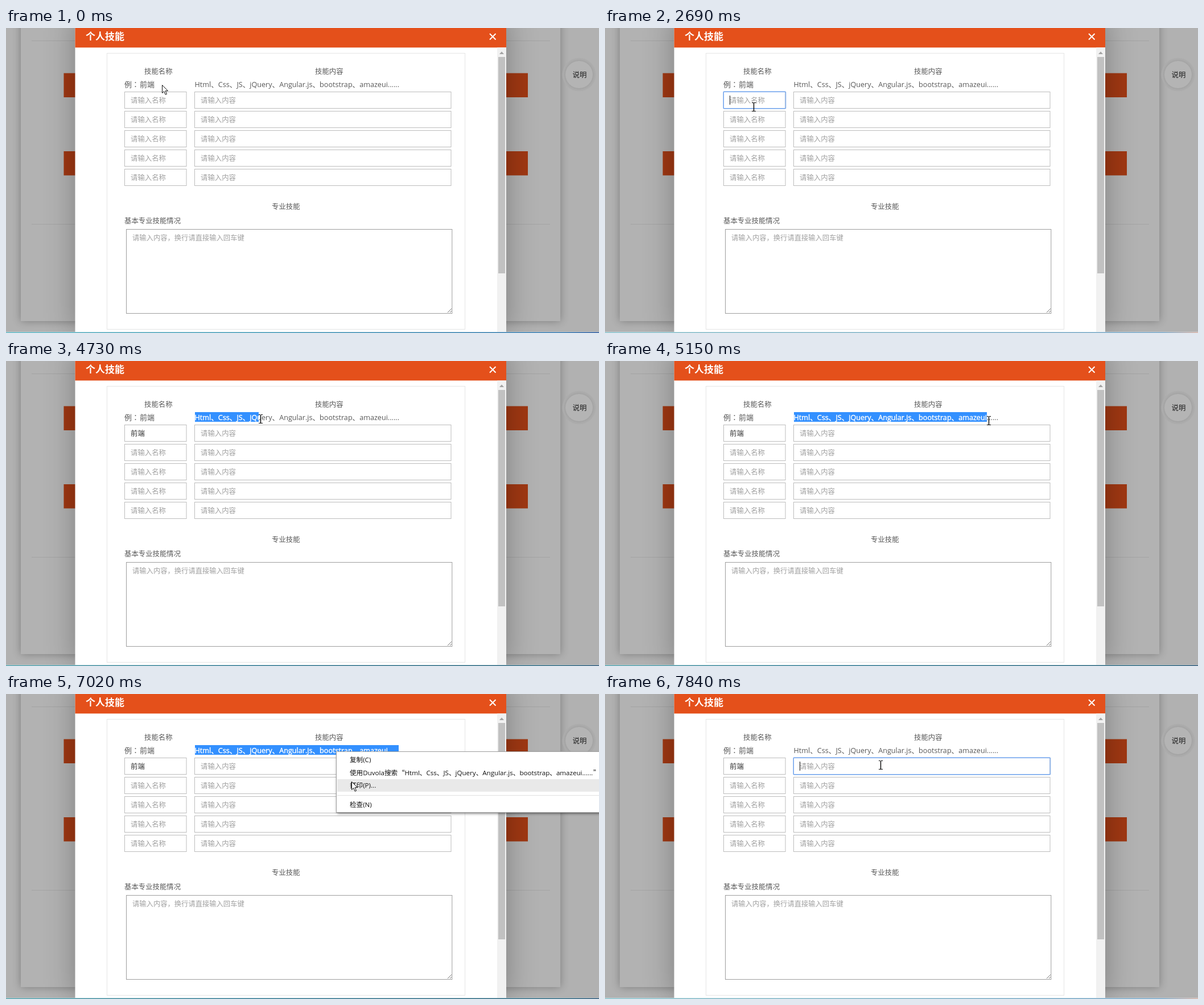
Animation, 1042 px wide and 537 px high, one loop 8 s. Source, as an HTML page with a canvas:

```html
<!DOCTYPE html>
<html lang="zh-CN">
<head>
<meta charset="utf-8">
<style>
html, body { margin: 0; width: 100%; height: 100%; overflow: hidden; background: #b2b2b2; }
canvas { display: block; }
</style>
</head>
<body>
<canvas id="stage" width="1042" height="537"></canvas>
<script>
const LOOP = 8000, W = 1042, H = 537;
const FONT = '"Open Sans", "Noto Sans CJK SC", "Noto Sans CJK", sans-serif';
const CJK = '"Noto Sans CJK SC", "Noto Sans CJK", sans-serif';
const CENTRED_COLON = '"Noto Sans CJK JP", "Noto Sans CJK", sans-serif';
const SKILLS = 'Html、Css、JS、jQuery、Angular.js、bootstrap、amazeui......';
const SKILLS_SIZE = 12.62;
const ORANGE = '#e4501b', SELECT = '#3390ff';
const screen = document.getElementById('stage').getContext('2d');
const backdrop = document.createElement('canvas');
backdrop.width = W;
backdrop.height = H;
let g = backdrop.getContext('2d');

function rect(x, y, w, h, color) {
  g.fillStyle = color;
  g.fillRect(x, y, w, h);
}

function frame(x, y, w, h, color) {
  g.strokeStyle = color;
  g.lineWidth = 1;
  g.strokeRect(x + .5, y + .5, w - 1, h - 1);
}

function line(points, color, width = 1) {
  g.beginPath();
  points.forEach(([x, y]) => g.lineTo(x, y));
  g.strokeStyle = color;
  g.lineWidth = width;
  g.stroke();
}

// y is the vertical centre of the CJK glyphs
function text(s, x, y, color = '#595959', size = 12.4, family = FONT, weight = 400) {
  g.font = `${weight} ${size}px ${family}`;
  g.fillStyle = color;
  g.fillText(s, x, y + size * .37);
}

function shadowed(blur, color, offset, paint) {
  g.save();
  g.shadowBlur = blur;
  g.shadowColor = color;
  g.shadowOffsetY = offset;
  paint();
  g.restore();
}

function disc(x, y, r, color) {
  g.beginPath();
  g.arc(x, y, r, 0, 7);
  g.fillStyle = color;
  g.fill();
}

function paintBackdrop() {
  rect(0, 0, W, H, '#b1b1b1');
  shadowed(14, 'rgba(0,0,0,.3)', 0, () => rect(26, -30, 948, 546, '#b2b2b2'));
  rect(45, 22, 911, 1, '#a3a3a3');
  rect(45, 345, 911, 1, '#a3a3a3');
  rect(101.5, 79.5, 815.5, 42.5, '#a03813');
  rect(101.5, 217, 815.5, 42.5, '#a03813');
  disc(1007, 82, 29.5, '#acacac');
  shadowed(4, 'rgba(0,0,0,.12)', 0, () => disc(1007, 82, 24, '#b4b4b4'));
  text('说明', 995.5, 82, '#1c1c1c');

  shadowed(50, 'rgba(0,0,0,.3)', 1, () => rect(121.5, -20, 757.5, 555, '#fff'));
  rect(121.5, 0, 757.5, 34.4, ORANGE);
  text('个人技能', 140, 15, '#fff', 17, FONT, 700);
  line([[850, 10], [860.5, 20.5]], '#fff', 2);
  line([[860.5, 10], [850, 20.5]], '#fff', 2);

  rect(863, 34.4, 16, 500.6, '#f1f1f1');
  rect(865, 51, 12, 381, '#c1c1c1');
  g.beginPath();
  g.moveTo(867, 46);
  g.lineTo(875, 46);
  g.lineTo(871, 41.5);
  g.fillStyle = '#a3a3a3';
  g.fill();

  frame(177, 44, 630, 487, '#e5e5e5');
  text('技能名称', 243, 76);
  text('技能内容', 543, 76);
  text('例：', 208, 99, '#595959', 13, CENTRED_COLON);
  text('前端', 235, 99, '#595959', 13);
  text(SKILLS, 331.5, 99, '#595959', SKILLS_SIZE);
  for (let i = 0; i < 5; i++) {
    const y = 112 + 34 * i;
    frame(208, y, 109.5, 30, '#bdbdbd');
    frame(331, y, 451.5, 30, '#bdbdbd');
    if (i) text('请输入名称', 219, y + 15, '#a0a0a0');
    text('请输入内容', 342, y + 15, '#a0a0a0');
  }
  text('专业技能', 467, 314);
  text('基本专业技能情况', 208, 339);
  frame(211, 354, 573.3, 149, '#9e9e9e');
  text('请输入内容，换行请直接输入回车键', 222, 369, '#a0a0a0', 12.3);
  line([[776, 501], [783, 494]], '#777');
  line([[780, 501], [783, 498]], '#777');
}

// start, end, number of steps, destination x, y
const MOVES = [
  [410, 1180, 11, 237, 100],
  [1390, 1450, 2, 264, 99],
  [2150, 2690, 9, 261, 139],
  [2870, 3260, 7, 385, 100],
  [3310, 3620, 6, 329, 96],
  [4250, 4400, 3, 334, 100],
  [4550, 5150, 12, 674, 105],
  [5210, 5330, 3, 706, 109],
  [5390, 5390, 1, 701, 101],
  [5630, 6020, 7, 645, 100],
  [6190, 6360, 4, 679, 137],
  [6420, 6600, 4, 580, 101],
  [6650, 7020, 6, 607, 154],
  [7080, 7340, 6, 613, 112],
  [7520, 7840, 6, 484, 125]
];

function pointerAt(t) {
  let x = 274, y = 100;
  for (const [start, end, steps, toX, toY] of MOVES) {
    if (t < start) break;
    const part = end > start ? (t - start) / (end - start) : 1;
    const p = Math.min(1, (Math.floor(part * (steps - 1) + 1e-6) + 1) / steps);
    x += (toX - x) * p;
    y += (toY - y) * p;
  }
  return { x: Math.round(x), y: Math.round(y) };
}

const within = (t, ...spans) => spans.some(([a, b]) => t >= a && t < b);

function highlight(s, textX, x, end, size) {
  if (end <= x) return;
  g.save();
  g.beginPath();
  g.rect(x, 90, end - x, 17);
  g.clip();
  rect(x, 90, end - x, 17, SELECT);
  text(s, textX, 99, '#fff', size);
  g.strokeStyle = '#fff';
  g.lineWidth = .4;
  g.strokeText(s, textX, 99 + size * .37);
  g.restore();
}

function focusRing(x, w) {
  frame(x, 112, w, 30, '#6a9fec');
  g.beginPath();
  g.roundRect(x - .5, 111.5, w + 1, 31, 2);
  g.strokeStyle = 'rgba(106,159,236,.5)';
  g.stroke();
}

function paintMenu(y) {
  shadowed(5, 'rgba(0,0,0,.6)', 2, () => rect(582, 103, 480, 105, '#fff'));
  rect(580, 101, 480, 108, '#fff');
  frame(580, 101, 480, 108, '#a0a0a0');
  const row = [105, 128, 150, 184].find(top => y >= top && y < top + 23);
  if (row) rect(582, row, 460, 22, '#e9e9e9');
  const label = (s, x, cy, family) => text(s, x, cy, '#111', 11.6, family);
  label('复制(C)', 604, 116);
  label('使用Duvola搜索', 604, 139);
  label('“', 689, 139, CJK);
  label(SKILLS, 700.5, 139);
  label('”', 1032, 139, CJK);
  label('打印(P)...', 604, 161);
  rect(582, 178, 460, 1, '#e0e0e0');
  label('检查(N)', 604, 195);
}

function paintBottomEdge(t) {
  let colors = ['#4a9ba6', '#2c7690', '#235f78', '#1f4c6e'];
  if (t < 800) colors = ['#55b0bd', '#3b97b4', '#2a70a8', '#1d4c94'];
  else if (within(t, [2450, 4600], [7700, LOOP])) colors = ['#7fbcc6', '#79b0c4', '#6d9fc2', '#d0a89c'];
  const fade = g.createLinearGradient(0, 0, W, 0);
  [0, .4, .94, 1].forEach((stop, i) => fade.addColorStop(stop, colors[i]));
  rect(0, 535, W, 1, '#fff');
  g.globalAlpha = .5;
  rect(0, 535, W, 1, fade);
  g.globalAlpha = 1;
  rect(0, 536, W, 1, fade);
}

function paintPointer({ x, y }, beam) {
  if (beam) {
    line([[x + .5, y - 7], [x + .5, y + 8]], '#000', 1.4);
    for (const cy of [y - 7.5, y + 7.5]) {
      line([[x - 3, cy], [x, cy]], '#000');
      line([[x + 1, cy], [x + 4, cy]], '#000');
    }
    return;
  }
  const shape = [[0, 0], [0, 14], [3.2, 11], [5.7, 16.8], [8, 15.8], [5.6, 10.2], [10, 10.2]];
  g.beginPath();
  shape.forEach(([dx, dy]) => g.lineTo(x + .5 + dx, y + .5 + dy));
  g.closePath();
  g.fillStyle = '#fff';
  g.fill();
  g.strokeStyle = '#111';
  g.lineWidth = 1;
  g.stroke();
}

function paint(t) {
  const pointer = pointerAt(t);
  g.drawImage(backdrop, 0, 0);

  if (t < 3250) text('请输入名称', 219, 127, '#a0a0a0');
  else text('前端', 219, 127, '#333');

  if (within(t, [1390, 2450])) highlight('前端', 235, 235, Math.min(262, pointer.x - 1), 13);
  if (within(t, [4550, 7780])) {
    const end = t < 5330 ? Math.min(690, pointer.x - 3) : 690;
    highlight(SKILLS, 331.5, 332, end, SKILLS_SIZE);
  }

  if (within(t, [2450, 4550])) {
    focusRing(208, 109.5);
    if (!within(t, [2980, 3250], [3780, 4080])) rect(t < 3250 ? 219 : 244, 119, 1, 16, '#111');
  }
  if (t >= 7780) {
    focusRing(331, 451.5);
    rect(342, 119, 1, 16, '#111');
  }

  if (within(t, [6600, 7520])) paintMenu(pointer.y);
  paintBottomEdge(t);
  paintPointer(pointer, within(t, [800, 1690], [2400, 3100], [4310, 5390], [7700, LOOP]));
}

paintBackdrop();
g = screen;
const begin = performance.now();
function tick() {
  paint((performance.now() - begin) % LOOP);
  requestAnimationFrame(tick);
}
tick();
</script>
</body>
</html>
```
